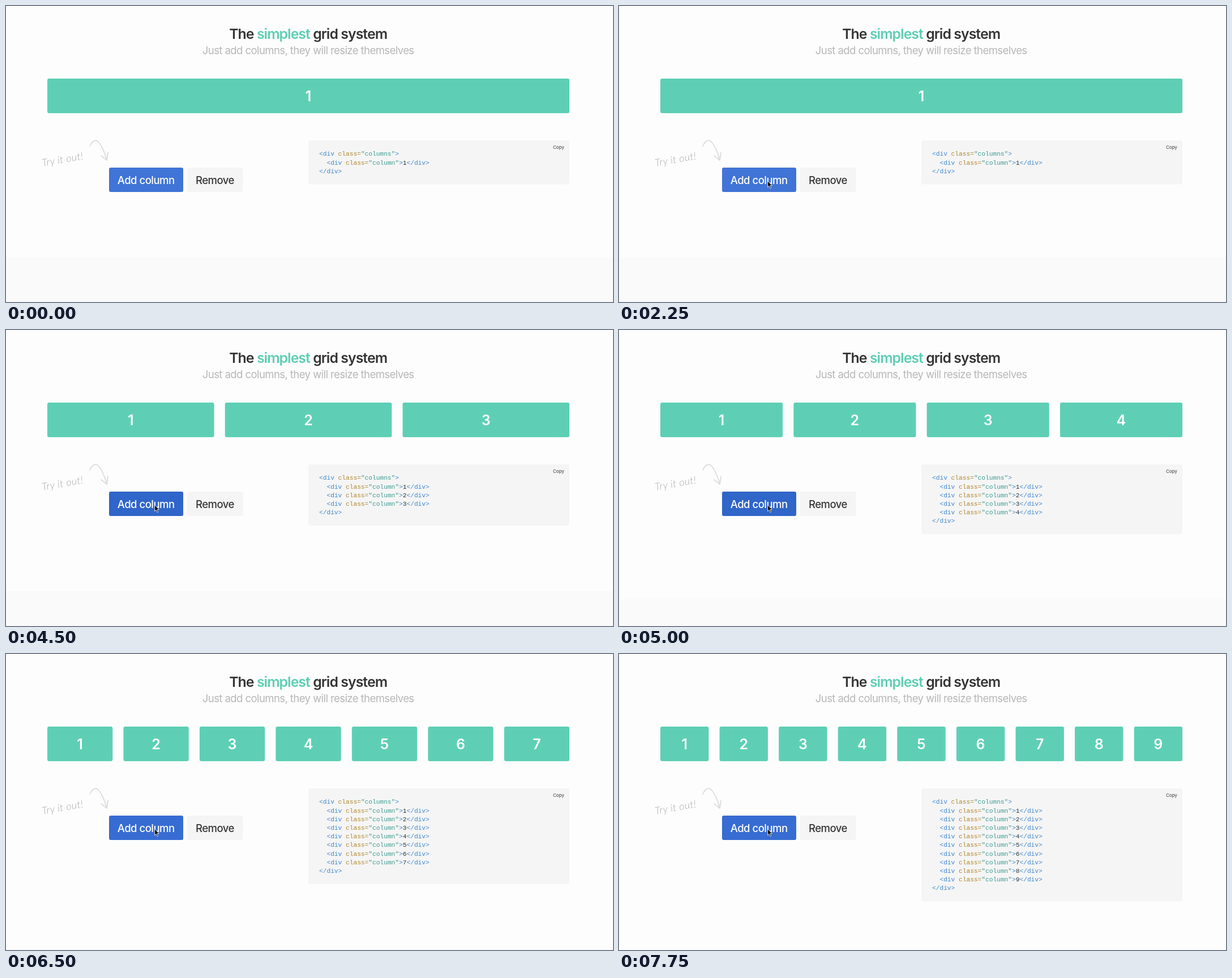
Animation of 1072x522 px, one loop 8000 ms. Source, as an HTML page:

```html
<!DOCTYPE html>
<html lang="en">
<head>
<meta charset="utf-8">
<title>Grid columns demo</title>
<style>
  html, body { margin: 0; width: 100%; height: 100%; overflow: hidden; background: #fdfdfd; }
  svg { display: block; font-family: Inter, Roboto, sans-serif; }
  .mid { text-anchor: middle; }
  .title { font-size: 24.8px; font-weight: 600; letter-spacing: -0.93px; fill: #343434; }
  .subtitle { font-size: 18.5px; letter-spacing: -0.57px; fill: #b7b7b7; }
  .teal { fill: #5dceb4; }
  .num { font-size: 25px; font-weight: 600; fill: #fff; }
  .label { font-size: 18.5px; font-weight: 500; letter-spacing: -0.5px; }
  .note { font: italic 300 18px Lato, sans-serif; letter-spacing: 0.4px; fill: #aaa; }
  .copy { font-size: 7.9px; font-weight: 500; fill: #555; }
  .code { font: 11.2px "Liberation Mono", "DejaVu Sans Mono", monospace; fill: #333; }
  .tag { fill: #3f86d0; }
  .attr { fill: #b0862c; }
  .str { fill: #3c9c92; }
</style>
</head>
<body>
<svg width="1072" height="522" viewBox="0 0 1072 522">
  <rect width="1072" height="522" fill="#fdfdfd"/>
  <rect id="footer" width="1072" height="522" fill="#fafafa"/>
  <text class="title mid" x="533.6" y="57.7">The <tspan class="teal">simplest</tspan> grid system</text>
  <text class="subtitle mid" x="533.7" y="84.8">Just add columns, they will resize themselves</text>
  <g id="columns"></g>

  <g fill="none" stroke="#dcdcdc" stroke-width="1.8" stroke-linecap="round" stroke-linejoin="round">
    <path d="M148 247C152 238 158 234 163.500 240C170 247 174 258 178 271"/>
    <path d="M168 264L178 272L180 258.500"/>
  </g>
  <text class="note" transform="translate(64.5 283) rotate(-10)">Try it out!</text>

  <rect id="add" x="182" y="285" width="131" height="43" rx="3"/>
  <text class="label mid" x="247.200" y="314" fill="#fff">Add column</text>
  <rect x="319.500" y="285" width="99" height="43" rx="3" fill="#f5f5f5"/>
  <text class="label mid" x="369" y="314" fill="#343434">Remove</text>

  <rect id="panel" x="534" y="237" width="461" rx="4" fill="#f5f5f5"/>
  <text class="copy mid" x="975.800" y="252.300">Copy</text>
  <g id="code" class="code"></g>

  <path id="cursor" d="M.5.500V11.700L3 9.400L4.900 13.700L6.700 12.900L4.900 8.700L8.300 8.500Z"
        fill="#111" stroke="#fff" stroke-width=".8" stroke-linejoin="round"/>
</svg>
<script>
const LOOP = 8000;
const LEFT = 73, WIDTH = 922, GAP = 19.2;
const LINE = 15.2, CHAR = 6.72;

// Each step: start time, then the value that holds until the next step.
const counts = [[0, 1], [3500, 2], [4000, 3], [4750, 4], [5250, 5],
                [6000, 6], [6500, 7], [7250, 8], [7750, 9]];
const pointer = [[0, null], [750, [363, 141]], [1000, [310, 199]], [1500, [302, 220]],
                 [1750, [273, 280]], [2000, [269, 289]], [2250, [262, 308]]];
const IDLE = "#4074d6", HOVER = "#376cd2", DOWN = "#3065c9";
const button = [[0, IDLE], [3250, DOWN], [3500, HOVER], [4500, DOWN], [4750, HOVER],
                [5000, DOWN], [5250, HOVER], [5750, DOWN], [6000, HOVER],
                [7000, DOWN], [7250, HOVER]];

const $ = id => document.getElementById(id);
const at = (steps, t) => steps.filter(s => s[0] <= t).pop()[1];
const span = (cls, text) => `<tspan class="${cls}">${text}</tspan>`;
const openDiv = name => span("tag", "&lt;div ") + span("attr", "class=") +
  span("str", `"${name}"`) + span("tag", "&gt;");
const closeDiv = span("tag", "&lt;/div&gt;");

function codeLine(html, row, indent) {
  const x = 553 + indent * CHAR, y = 264.3 + row * LINE;
  return `<text x="${x}" y="${y}" style="white-space:pre">${html}</text>`;
}

function showColumns(n) {
  const pitch = (WIDTH + GAP) / n, w = pitch - GAP;
  let boxes = "", code = codeLine(openDiv("columns"), 0, 0);
  for (let i = 0; i < n; i++) {
    const x = LEFT + i * pitch;
    boxes += `<rect x="${x}" y="128" width="${w}" height="61" rx="3" fill="#5ecfb5"/>` +
      `<text class="num mid" x="${x + w / 2}" y="168">${i + 1}</text>`;
    code += codeLine(openDiv("column") + (i + 1) + closeDiv, i + 1, 2);
  }
  code += codeLine(closeDiv, n + 1, 0);
  $("columns").innerHTML = boxes;
  $("code").innerHTML = code;

  const height = 32 + (n + 2) * LINE;
  $("panel").setAttribute("height", height);
  $("footer").setAttribute("y", Math.max(443.5, 237 + height + 115));
}

let shown = 0;
function draw() {
  const t = performance.now() % LOOP;
  const n = at(counts, t), tip = at(pointer, t);
  if (n !== shown) showColumns(shown = n);
  $("add").setAttribute("fill", at(button, t));
  $("cursor").setAttribute("visibility", tip ? "visible" : "hidden");
  if (tip) $("cursor").setAttribute("transform", `translate(${tip})`);
  requestAnimationFrame(draw);
}
draw();
</script>
</body>
</html>
```
